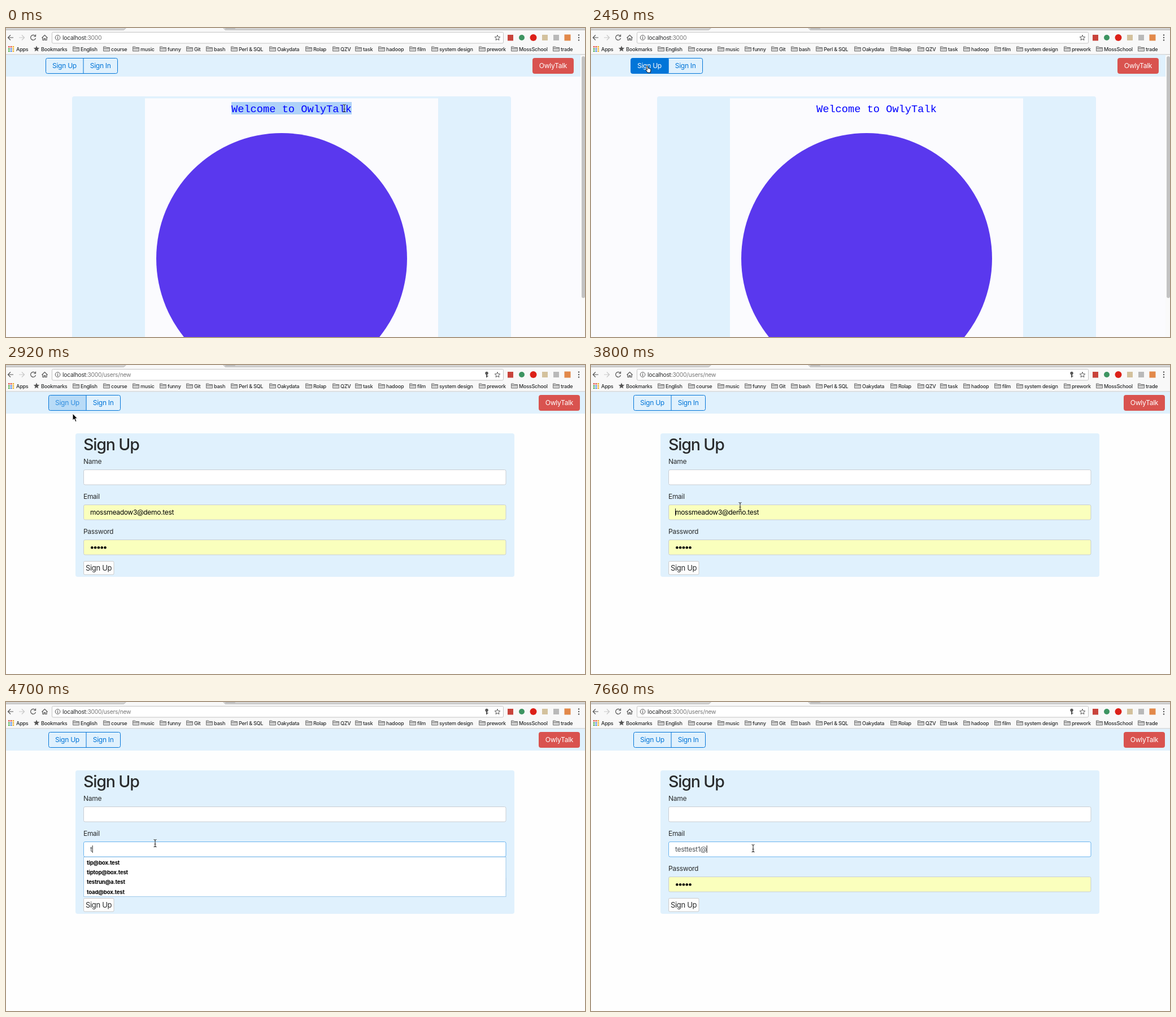
Animation of 1025x547 px, one loop 8000 ms. Source, as an HTML page:

```html
<!DOCTYPE html>
<html lang="en">
<head>
<meta charset="utf-8">
<title>Sign up demo</title>
<style>
  html, body { margin: 0; width: 100%; height: 100%; overflow: hidden; background: #fefefe; }
  svg { display: block; width: 100%; height: 100%; }
  text { font: 12px Inter, "Open Sans", sans-serif; letter-spacing: -.025em; white-space: pre; }
  .bookmark { font-size: 9.1px; font-weight: 500; letter-spacing: -.03em; }
  .url { font-size: 10.3px; }
  .nav { font-size: 12.1px; text-anchor: middle; }
  .title { font-size: 28.5px; font-weight: 500; letter-spacing: -.04em; }
  .submit { font-size: 13px; }
  .option { font-size: 9.6px; font-weight: 700; letter-spacing: -.02em; }
  .welcome { font: 18.68px "Liberation Mono", monospace; letter-spacing: 0; }
</style>
</head>
<body>
<svg id="stage" viewBox="0 0 1025 547"></svg>
<script>
const LOOP = 8000;
const BLUE = '#0275d8', PALE = '#e0f1fd', YELLOW = '#faffbd', INK = '#292b2c', PAGE = '#fbfbfe';
const APP = 'OwlyTalk';
const SAVED = 'mossmeadow3@demo.test';
const FOR_T = ['tip@box.test', 'tiptop@box.test', 'testrun@a.test', 'toad@box.test'];
const ALL = [SAVED, ...FOR_T, 'testtoad@box.test', 'anna@box.test', 'bird@box.test'];

// Each track lists [start time, value]; a value holds until the next start.
const POINTER = [
  [0, ['beam', 599, 142]], [150, ['beam', 570, 141]], [310, ['arrow', 420, 126]],
  [470, ['arrow', 280, 103]], [640, ['arrow', 180, 86]], [800, ['hand', 116, 74]],
  [960, ['hand', 98, 73]], [1560, ['hand', 99, 73]], [1710, ['hand', 101, 73]],
  [2900, ['arrow', 122, 93]], [3060, ['beam', 168, 142]], [3210, ['beam', 232, 193]],
  [3360, ['beam', 262, 218]], [3510, ['beam', 264, 236]], [3660, ['beam', 264, 250]],
  [5870, ['beam', 287, 258]], [6170, ['beam', 287, 259]]
];
const HOVER = [[0, 0], [800, .5], [960, 1], [2600, .18], [2760, 1], [2900, .18], [3060, 0]];
const TYPED = [
  [0, ''], [4700, 't'], [4990, 'te'], [5280, 'tes'], [5570, 'test'], [5870, 'testt'],
  [6020, 'testte'], [6170, 'testtes'], [6310, 'testtest'], [7210, 'testtest1'], [7660, 'testtest1@']
];
const OPTIONS = [
  [0, []], [4100, ALL], [4700, FOR_T], [4990, ['testrun@a.test']],
  [5870, ['testtoad@box.test']], [7210, []]
];
const CARET = [[0, 0], [3800, 1], [3950, 0], [4100, 1], [6910, 0], [7210, 1]];
const at = (track, t) => track.findLast(([start]) => start <= t)[1];

const rect = (x, y, w, h, fill, extra = '') =>
  `<rect x="${x}" y="${y}" width="${w}" height="${h}" fill="${fill}" ${extra}/>`;
const text = (x, y, words, style = '', fill = INK, extra = '') =>
  `<text x="${x}" y="${y}" class="${style}" fill="${fill}" ${extra}>${words}</text>`;
const path = (d, stroke, fill = 'none', width = 1.2) =>
  `<path d="${d}" stroke="${stroke}" fill="${fill}" stroke-width="${width}"/>`;
const circle = (x, y, r, fill, extra = '') =>
  `<circle cx="${x}" cy="${y}" r="${r}" fill="${fill}" ${extra}/>`;

const BOOKMARKS = {
  English: 118, course: 172, music: 224, funny: 272, Git: 319, bash: 354, 'Perl &amp; SQL': 398,
  Oakydata: 466, Rolap: 530, QZV: 578, task: 618, hadoop: 659, film: 714,
  'system design': 753, prework: 837, MossSchool: 894, trade: 968
};

function star(cx, cy, r, fill, stroke) {
  const points = Array.from({ length: 10 }, (_, i) => {
    const a = i * Math.PI / 5, d = i % 2 ? r * .45 : r;
    return `${cx + d * Math.sin(a)},${cy - d * Math.cos(a)}`;
  });
  return `<polygon points="${points}" fill="${fill}" stroke="${stroke}"/>`;
}

function appsGrid() {
  const colors = ['#e2574c', '#e2574c', '#f0b429', '#4caf50', '#4a86e8', '#f0b429', '#4caf50', '#4a86e8', '#f0b429'];
  return colors.map((c, i) => rect(4 + i % 3 * 3.8, 32 + Math.floor(i / 3) * 3.8, 2.6, 2.6, c)).join('');
}

const TOOLBAR =
  rect(0, 0, 1025, 47, '#f8f8f8') + rect(0, 0, 1025, 3.5, '#d3d3d3') +
  path('M0 3.5H208L213 0M384 0L388 3.5H1025', '#b9b9b9', 'none', 1) +
  path('M209 4L213 0H384L388 4Z', 'none', '#f8f8f8') + rect(388, 0, 18, 2, '#bbb', 'rx="1"') +
  path('M13 17H4M8 12.5L3.5 17L8 21.5', '#555') +
  path('M23 17H32M28 12.5L32.5 17L28 21.5', '#c8c8c8') +
  path('M51.6 14A4.5 4.5 0 1 0 52.5 18M52.5 11.5V15H49', '#555') +
  path('M63.5 17.5L68.5 12.5L73.5 17.5M65 17V21.5H67.5V18.5H69.5V21.5H72V17', '#555') +
  rect(81.5, 7.5, 799, 19.5, '#fff', 'rx="2" stroke="#c4c4c4"') +
  circle(91.5, 17, 4.3, 'none', 'stroke="#555"') + rect(91, 16.3, 1.2, 3.4, '#555') + rect(91, 14.2, 1.2, 1.3, '#555') +
  star(870, 17.5, 5, 'none', '#555') +
  rect(888, 12, 10, 10.5, '#c8433b') + circle(913, 17, 5, '#3d9461') + circle(933.5, 17, 6, '#dc2018') +
  rect(949, 12, 10, 10, '#d3c19d') + rect(969, 12, 10, 10, '#b9b9b9') + rect(988.5, 11.5, 11, 11, '#e2894a') +
  [12.5, 17, 21.5].map(y => circle(1014, y, 1.2, '#555')).join('') +
  appsGrid() + text(18, 40.5, 'Apps', 'bookmark') +
  star(54, 37, 5.5, '#555', 'none') + text(62, 40.5, 'Bookmarks', 'bookmark') +
  Object.entries(BOOKMARKS).map(([name, x]) =>
    path(`M${x + .5} 41V33H${x + 4.5}L${x + 6} 34.5H${x + 11.5}V41ZM${x + .5} 36H${x + 11.5}`, '#777', '#d2d2d2', 1) +
    text(x + 14, 40.5, name, 'bookmark')).join('') +
  rect(0, 46.5, 1025, 1, '#bcbcbc');

function urlBar(onForm, withKey) {
  const route = `<tspan fill="#777">:3000${onForm ? '/users/new' : ''}</tspan>`;
  const key = circle(851, 14.5, 2.7, '#555') + rect(850, 16, 2, 6, '#555') + rect(851, 19, 2.6, 1.3, '#555');
  return text(100, 20.8, 'localhost' + route, 'url') + (withKey ? key : '');
}

function navBar(onForm, hover) {
  const x = onForm ? 75.5 : 70.5, right = onForm ? 943 : 932;
  return rect(0, 47.5, onForm ? 1025 : 1017, 38.5, PALE) +
    rect(x, 53.5, 67, 27, BLUE, `rx="3" fill-opacity="${hover}"`) +
    rect(x, 53.5, 127, 27, 'none', `rx="3" stroke="${BLUE}"`) +
    path(`M${x + 66.5} 53.5v27`, BLUE, 'none', 1) +
    text(x + 33, 71.4, 'Sign Up', 'nav', `color-mix(in srgb, #fff ${hover * 100}%, ${BLUE})`) +
    text(x + 96.7, 71.4, 'Sign In', 'nav', BLUE) +
    rect(right + .5, 53.5, 72, 27, '#d9534f', 'rx="3" stroke="#d9534f"') +
    text(right + 36.5, 71.4, APP, 'nav', '#fff');
}

function homePage(selected) {
  return rect(0, 86, 1025, 461, PAGE) +
    rect(117, 121, 777, 440, PALE, 'rx="4"') + rect(246, 124.5, 519, 423, PAGE) +
    circle(488, 408, 222, '#5a38ee') +
    (selected ? rect(399, 131, 213, 22, '#afd2f8') : '') +
    text(399, 149, 'Welcome to ' + APP, 'welcome', '#00f') +
    rect(1017, 48, 8, 499, '#fafafa') + rect(1019, 50, 6, 428, '#c3c3c3', 'rx="3"');
}

const field = (y, fill = '#fff', border = '#c9ced3') =>
  rect(137.5, y + .5, 747.5, 26.5, fill, `rx="2.5" stroke="${border}"`);

function optionList(options) {
  if (!options.length) return '';
  return rect(137.5, 274.5, 747.5, options.length * 17.3 + .7, '#fff', 'stroke="#9fc9ea"') +
    options.map((name, i) => text(143, 287.7 + i * 17.3, name, 'option', '#000')).join('');
}

function formPage(t) {
  const filled = t >= 2760, edited = t >= 4100, selected = t >= 3950 && !edited;
  const email = edited ? at(TYPED, t) : filled ? SAVED : '';
  const border = t >= 3950 ? '#6ab4ee' : undefined;
  let dots = '';
  if (filled) for (let i = 0; i < 5; i++) dots += circle(152.3 + i * 5.8, 323.3, 2.3, '#000');
  return rect(0, 86, 1025, 461, '#fefefe') + rect(123, 121, 777, 254, PALE, 'rx="4"') +
    text(137, 151, 'Sign Up', 'title') +
    text(137, 175, 'Name') + field(185) +
    text(137, 237, 'Email') + field(247, filled && !edited ? YELLOW : '#fff', border) +
    (selected ? rect(149, 253, 146, 15, '#afd2f8') : '') +
    text(149, 265, email, '', edited ? '#4c5257' : '#000', 'id="email"') +
    text(137, 299, 'Password') + field(309, filled ? YELLOW : '#fff') + dots +
    rect(137.5, 347.5, 53.5, 23.5, '#fdfdfd', 'rx="2" stroke="#ccc"') +
    text(141, 363.8, 'Sign Up', 'submit') +
    optionList(at(OPTIONS, t)) +
    (at(CARET, t) ? rect(149, 254, 1, 13, '#222', 'id="caret"') : '');
}

const POINTERS = {
  beam: path('M-2.5 -6.5Q0 -6.5 0 -4.5Q0 -6.5 2.5 -6.5M0 -5V5M-2.5 6.5Q0 6.5 0 4.5Q0 6.5 2.5 6.5M-1.5 1.5H1.5', '#333', 'none', 1.1),
  arrow: path('M-4 -7V5L-1.2 2.5L1 7.5L3 6.6L.9 1.8H4.5Z', '#fff', '#000', 1),
  hand: path('M-2.8 -5.3Q-2 -6.6 -.9 -5.3L.4 -1.2Q1.5 -2.2 2.3 -.9Q3.4 -1.6 4 -.2Q5.2 -.4 5 1.2L4.3 6H-.8L-3.8 1.8Q-4.2 .3 -2.6 .6L-1.5 1.5Z', '#111', '#fff', 1)
};

function pointer([kind, x, y]) {
  return `<g transform="translate(${x} ${y})">${POINTERS[kind]}</g>`;
}

const stage = document.getElementById('stage');
let shown = '';

function frame(now) {
  const t = now % LOOP, onForm = t >= 2600;
  const picture = (onForm ? formPage(t) : homePage(t < 150)) + TOOLBAR +
    urlBar(onForm, t >= 2760) + navBar(onForm, at(HOVER, t)) + pointer(at(POINTER, t));
  if (picture !== shown) {
    stage.innerHTML = shown = picture;
    const caret = document.getElementById('caret');
    if (caret && t >= 4100) {
      caret.setAttribute('x', 149 + document.getElementById('email').getComputedTextLength());
    }
  }
  requestAnimationFrame(frame);
}
frame(0);
</script>
</body>
</html>
```
